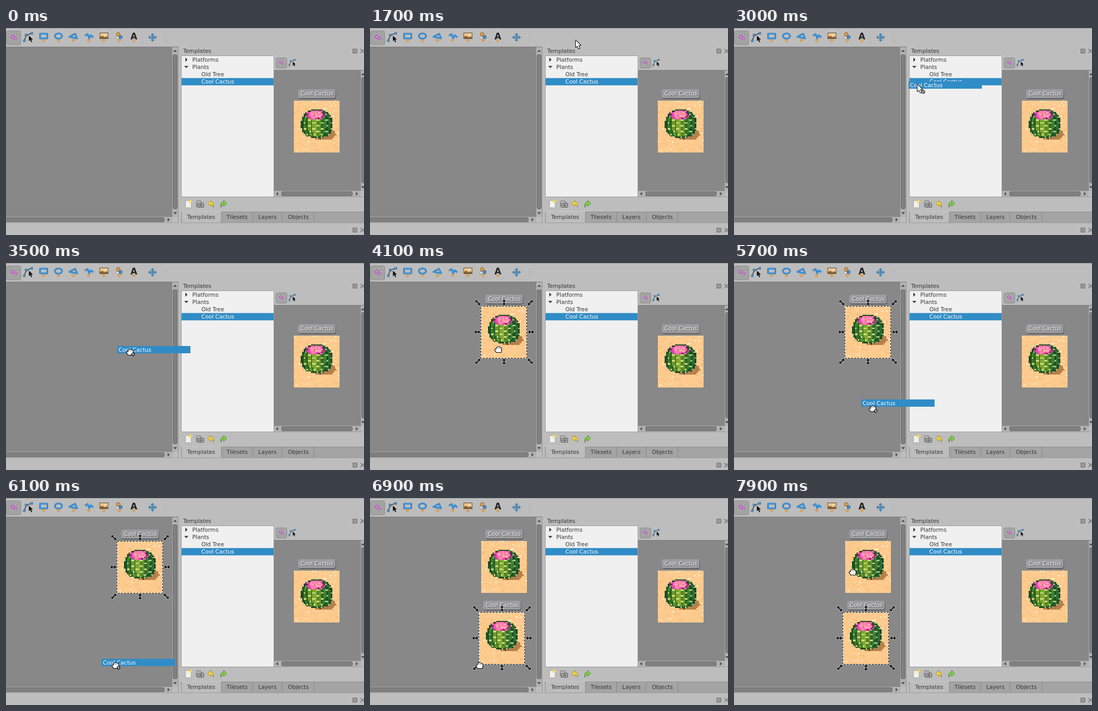
Recreate the animation shown at these times as an HTML page with a canvas. Size 689x399 px, loop 8 s.

```html
<!DOCTYPE html>
<html>
<head>
<meta charset="utf-8">
<style>
html, body { margin: 0; width: 100%; height: 100%; overflow: hidden; background: #bdbdbd; }
canvas { display: block; }
</style>
</head>
<body>
<canvas id="stage" width="689" height="399"></canvas>
<script>
const stage = document.getElementById('stage').getContext('2d');
let g = stage;

const rect = (x, y, w, h, c) => { g.fillStyle = c; g.fillRect(x, y, w, h); };

function round(x, y, w, h, r, fill, line) {
  g.beginPath();
  g.roundRect(x, y, w, h, r);
  if (fill) { g.fillStyle = fill; g.fill(); }
  if (line) { g.strokeStyle = line; g.lineWidth = 1; g.stroke(); }
}

function text(s, x, y, c = '#363636') {
  g.font = '10.67px "DejaVu Sans", sans-serif';
  g.fillStyle = c;
  g.fillText(s, x, y);
}

// Polygon or polyline through a flat list of coordinates
function poly(pts, fill, line, width = 1, closed = true) {
  g.beginPath();
  for (let i = 0; i < pts.length; i += 2) g.lineTo(pts[i], pts[i + 1]);
  if (closed) g.closePath();
  if (line) { g.strokeStyle = line; g.lineWidth = width; g.lineJoin = 'round'; g.stroke(); }
  if (fill) { g.fillStyle = fill; g.fill(); }
}

function oval(x, y, rx, ry, fill, line, width = 1) {
  g.beginPath();
  g.ellipse(x, y, rx, ry, 0, 0, 7);
  if (fill) { g.fillStyle = fill; g.fill(); }
  if (line) { g.strokeStyle = line; g.lineWidth = width; g.stroke(); }
}

function at(x, y, turn, scale, draw) {
  g.save();
  g.translate(x, y);
  g.rotate(turn);
  g.scale(scale, scale);
  draw();
  g.restore();
}

function layer(w, h, draw) {
  const c = document.createElement('canvas');
  c.width = w;
  c.height = h;
  const old = g;
  g = c.getContext('2d');
  draw();
  g = old;
  return c;
}

let seed = 11;
const rnd = () => (seed = seed * 16807 % 2147483647) / 2147483647;

// Pixel art: sand, shadow, ribbed body, flower
const cactus = layer(32, 36, () => {
  const ribs = ['#1c4f1e', '#437f2c', '#2a6428', '#6b9a2d', '#41762b', '#7ca630', '#8db335',
    '#4c852c', '#68982f', '#2c682b', '#40802f', '#17502a', '#2f6d30', '#0f4424'];
  const pinks = ['#ff8fae', '#ffa9bc', '#f868a0', '#ff7f98'];
  for (let y = 0; y < 36; y++) for (let x = 0; x < 32; x++) {
    const n = rnd(), m = rnd();
    let c = n < .02 ? '#ffe9cc' : n < .09 ? '#f4bf7e' : n < .2 ? '#fed19a' : '#fdca8d';
    if (((x - 20.5) / 8.6) ** 2 + ((y - 22.8) / 4.2) ** 2 < 1) c = '#b5804a';
    const v = Math.abs((y - 15.4) / 9.9), p = y < 15 ? 2.2 : 2.8;
    const half = 11 * Math.pow(Math.max(0, 1 - v ** p), 1 / p);
    const u = (x - 15.8) / (half || 1);
    if (v < 1 && Math.abs(u) <= 1) {
      const k = Math.min(13, Math.floor((u + 1) * 7));
      c = ribs[k];
      if (v > .92) c = '#184a20';
      if (k % 2 && (y + k) % 4 == 0) c = u > .4 ? '#a9c47a' : '#dcdc80';
    }
    const f = ((x - 14.8) / 6.4) ** 2 + ((y - 9.4) / 3.6) ** 2;
    if (f < 1 && y > 6)
      c = f > .5 ? (m < .3 ? '#5a2a38' : m < .75 ? '#e83cc0' : '#f878b0') : pinks[Math.floor(m * 4)];
    if (x == 18 && y > 24 && y < 27) c = '#4f4a26';
    rect(x, y, 1, 1, c);
  }
});

function object(x, y) {
  g.imageSmoothingEnabled = false;
  g.drawImage(cactus, x + .5, y, 88, 100);
  round(x + 10, y - 21, 72, 18, 4, '#606060');
  round(x + 9, y - 22, 72, 17, 4, '#9e9ea1');
  text('Cool Cactus', x + 15, y - 9, '#404040');
  text('Cool Cactus', x + 14, y - 10, '#fff');
}

function handle(x, y, turn, len) {
  at(x, y, turn, 1, () => {
    const l = len, b = len - 3.5;
    poly([-l, 0, -b, -3.5, -b, -.8, b, -.8, b, -3.5, l, 0, b, 3.5, b, .8, -b, .8, -b, 3.5],
      '#000', 'rgba(255,255,255,.35)', 1.6);
  });
}

function selection(x, y, t) {
  g.lineWidth = 1;
  g.strokeStyle = '#fff';
  g.strokeRect(x + .5, y + .5, 88, 100);
  g.strokeStyle = '#000';
  g.setLineDash([3, 3]);
  g.lineDashOffset = -t / 100;
  g.strokeRect(x + .5, y + .5, 88, 100);
  g.setLineDash([]);
  const q = Math.PI / 4;
  for (const [dx, dy, turn] of [[-5.5, -6.5, 1], [95.5, -6.5, -1], [-5.5, 106.5, -1], [95.5, 106.5, 1]])
    handle(x + dx, y + dy, turn * q, 6.5);
  handle(x + 45, y - 7, 2 * q, 5.5);
  handle(x + 45, y + 107, 2 * q, 5.5);
  handle(x - 6.5, y + 50, 0, 5.5);
  handle(x + 97, y + 50, 0, 5.5);
}

// Scroll bars: one triangle per end, one thumb between
function tri(x, y, turn) {
  at(x, y, turn, 1, () => poly([-3.5, 2, 0, -2, 3.5, 2], '#4a4a4a'));
}
function thumb(x, y, w, h) {
  round(x + .5, y + .5, w - 1, h - 1, 2, '#808080', '#686868');
}
function track(x, y, w, h) {
  rect(x, y, w, h, '#b2b2b2');
}

const arrowShape = [0, 0, 0, 13, 3, 10.2, 5.4, 15.6, 7.6, 14.6, 5.2, 9.3, 9.4, 9.3];

function selectIcon(x, y, s) {
  at(x, y, 0, s, () => {
    round(-7.5, -5.5, 15, 11, 0, null, '#e4dce4');
    g.strokeStyle = '#6a6a6a';
    g.setLineDash([2, 2]);
    g.strokeRect(-7.5, -5.5, 15, 11);
    g.setLineDash([]);
    oval(-2, -1, 3.5, 3, '#dc88dc', '#a040a8');
    round(0, 0, 5, 4, 1, '#e09ae2', '#a040a8');
  });
}

function nodeIcon(x, y, s) {
  at(x, y, 0, s, () => {
    g.beginPath();
    g.moveTo(-7, 6);
    g.quadraticCurveTo(-5, -6, 7, -7);
    g.strokeStyle = '#303840';
    g.lineWidth = 1.2;
    g.stroke();
    for (const [a, b] of [[-7, 6], [-4, -4], [6, -7]]) {
      rect(a - 2, b - 2, 4, 4, '#1d5f98');
      rect(a - 1, b - 1, 2, 2, '#7ec0f0');
    }
    at(1, -3, 0, .75, () => poly(arrowShape, '#111'));
  });
}

function blue(pts, closed) {
  poly(pts, null, '#186cb8', 3, closed);
  poly(pts, null, '#45a5ee', 1.4, closed);
}

function toolbar() {
  round(.5, 5.5, 28, 27, 3, '#a3a3a3', '#8f8f8f');
  selectIcon(15, 18, 1);
  nodeIcon(43, 18, 1.1);
  blue([65.5, 11, 79.5, 11, 79.5, 20, 65.5, 20], true);
  oval(101, 15.5, 7, 5, null, '#186cb8', 3);
  oval(101, 15.5, 7, 5, null, '#45a5ee', 1.4);
  blue([122, 17, 133, 11, 137, 20], true);
  blue([152, 15, 157, 11.5, 160, 20, 163, 14, 168, 18], false);
  rect(180, 9, 17, 12, '#5c5040');
  rect(181, 10, 15, 10, '#ecc48c');
  poly([181, 20, 181, 17, 185, 15, 190, 18, 193, 16, 196, 18, 196, 20], '#8a6030');
  oval(191, 13, 1.5, 1.5, '#fff0b0');
  oval(216, 12.5, 3.5, 4, '#dc9a50', '#96601e');
  round(211.5, 16.5, 6, 4, 2, '#f0f0f0', '#8a8a8a');
  round(217.5, 14.5, 6, 6, 2, '#4a90d0', '#235f96');
  g.font = 'bold 17px "DejaVu Sans", sans-serif';
  g.fillStyle = '#222';
  g.textAlign = 'center';
  g.fillText('A', 246, 22);
  g.textAlign = 'left';
  for (const x of [72, 101, 130, 159, 188, 218, 246]) {
    oval(x, 23.5, 3, 1.5, '#f2b868', '#c08030', .8);
    rect(x - 1.5, 25, 3, 2, '#d99a4c');
  }
  for (let i = 0; i < 4; i++) at(282, 18, i * Math.PI / 2, 1, () =>
    poly([-1, 0, -1, -5, -3, -5, 0, -8, 3, -5, 1, -5, 1, 0], '#4e92c4', '#225b88', .9));
  rect(281, 17, 2, 2, '#4e92c4');
  for (let y = 11; y < 27; y += 3) { rect(305, y, 1, 1, '#a4a4a4'); rect(308, y, 1, 1, '#a4a4a4'); }
}

function bentArrow(x, dir, fill, line) {
  g.save();
  g.translate(x, 339);
  g.scale(dir, 1);
  g.beginPath();
  g.moveTo(-6.5, -1);
  g.lineTo(-1, -6.5);
  g.lineTo(-1, -3.5);
  g.quadraticCurveTo(7, -3, 4, 7);
  g.quadraticCurveTo(4, 1, -1, 1.5);
  g.lineTo(-1, 4.5);
  g.closePath();
  g.fillStyle = fill;
  g.strokeStyle = line;
  g.lineWidth = 1;
  g.fill();
  g.stroke();
  g.restore();
}

function dockButtons(y) {
  g.strokeStyle = '#606060';
  g.lineWidth = 1;
  g.strokeRect(667.5, y - 3.5, 8, 8);
  g.strokeRect(669.5, y - 1.5, 4, 4);
  poly([682, y - 3.5, 690, y + 4.5], null, '#686868', 1.2, false);
  poly([690, y - 3.5, 682, y + 4.5], null, '#686868', 1.2, false);
}

const ui = layer(689, 399, () => {
  rect(0, 0, 689, 399, '#bdbdbd');
  rect(0, 0, 689, 1, '#8f8f8f');
  rect(0, 1, 689, 1, '#c4c4c4');
  toolbar();

  rect(0, 36, 332, 1, '#7a7a7a');
  rect(0, 37, 320, 327, '#888');
  track(320, 37, 12, 327);
  tri(325.5, 44, 0);
  thumb(321, 51, 9, 298);
  tri(325.5, 357, Math.PI);
  track(0, 364, 320, 11);
  thumb(-4, 365, 309, 9);
  tri(313, 369.5, Math.PI / 2);
  rect(0, 375, 332, 1, '#a0a0a0');
  rect(331, 37, 1, 339, '#909090');

  text('Templates', 341, 48);
  dockButtons(44);
  dockButtons(389);

  rect(337, 53, 179, 273, '#9c9c9c');
  rect(338, 54, 177, 271, '#f0f0f0');
  poly([345, 57, 349.5, 61, 345, 65], '#444');
  poly([343, 73, 351, 73, 347, 77.5], '#444');
  text('Platforms', 358.5, 65);
  text('Plants', 358.5, 79);
  text('Old Tree', 376, 93);
  rect(338, 96.5, 177, 14, '#308cc6');
  text('Cool Cactus', 376, 107, '#fff');

  round(519.5, 57.5, 21, 20, 3, '#a3a3a3', '#8f8f8f');
  selectIcon(530, 66.5, .8);
  nodeIcon(551, 67, .8);
  rect(516, 81, 173, 1, '#7a7a7a');
  rect(516, 82, 167, 232, '#888');
  object(553, 140);
  track(683, 82, 6, 232);
  tri(687, 89, 0);
  thumb(684, 95, 9, 204);
  tri(687, 307, Math.PI);
  track(516, 314, 167, 11);
  tri(521.5, 319.5, -Math.PI / 2);
  thumb(530, 315, 137, 9);
  tri(675.5, 319.5, Math.PI / 2);
  rect(516, 325, 173, 1, '#9c9c9c');

  round(345.5, 332.5, 11, 14, 1, '#f0f0ea', '#a0a098');
  oval(355, 334, 3, 3, '#f4d848');
  round(366.5, 333.5, 9, 11, 1, '#c8c8c8', '#585858');
  round(368.5, 337.5, 12, 8, 1, '#a8a8a8', '#484848');
  rect(372, 340, 5, 3, '#686868');
  bentArrow(395, 1, '#f2d84a', '#a8861c');
  bentArrow(418, -1, '#86d04a', '#3f8a22');

  rect(414, 354, 275, 21, '#a4a4a4');
  rect(338, 353, 77, 1, '#c8c8c8');
  rect(414, 354, 275, 1, '#8c8c8c');
  rect(337, 375, 352, 1, '#9a9a9a');
  for (const x of [337, 414, 474, 531, 592]) rect(x, 354, 1, 21, '#8a8a8a');
  [['Templates', 348.5], ['Tilesets', 424.5], ['Layers', 485.5], ['Objects', 542.5]]
    .forEach(([s, x]) => text(s, x, 368));
});

function arrow(x, y, blocked) {
  at(x, y, 0, 1, () => poly(arrowShape, '#fff', '#000', 2));
  if (!blocked) return;
  oval(x + 11, y + 14, 3.2, 3.2, '#ddd', '#333', 1.3);
  poly([x + 9, y + 12, x + 13, y + 16], null, '#333', 1.2, false);
}

function hand(x, y, plus) {
  at(x, y, 0, 1, () => {
    g.beginPath();
    g.moveTo(-4, 5.5);
    g.lineTo(-7, 1);
    g.quadraticCurveTo(-7, -2, -4, -1);
    g.quadraticCurveTo(-5, -5, -2, -5);
    g.quadraticCurveTo(0, -6.5, 2, -5);
    g.quadraticCurveTo(6.5, -5, 6.5, 0);
    g.lineTo(5.5, 5.5);
    g.closePath();
    g.fillStyle = '#fff';
    g.strokeStyle = '#000';
    g.lineWidth = 1.2;
    g.fill();
    g.stroke();
    for (const a of [-1.5, 1, 3.5]) rect(a, -3.5, .8, 2, '#444');
    if (plus) {
      rect(2, 2.5, 7, 3, '#000');
      rect(4, .5, 3, 7, '#000');
      rect(3, 3.5, 5, 1, '#fff');
      rect(5, 1.5, 1, 5, '#fff');
    }
  });
}

// Paths as [ms, x, y]
const pointer = [[1500, 402, 0], [1900, 389, 48], [2300, 398, 105], [2700, 398, 105],
  [2800, 375, 104], [3000, 353, 109], [3300, 282, 142], [3600, 218, 187], [3900, 218, 187],
  [4000, 226, 188], [4100, 247, 167], [4400, 340, 125], [4700, 398, 106], [5000, 398, 106],
  [5100, 386, 104], [5300, 350, 158], [5600, 292, 261], [5700, 267, 281], [5900, 231, 311],
  [6100, 211, 323], [7400, 211, 323], [7500, 209, 305], [7900, 228.5, 143]];
const dragA = [[2800, 356, 98], [3000, 336, 103], [3300, 261, 133], [3600, 190, 174]];
const dragB = [[5100, 369, 98], [5300, 332, 150], [5600, 271, 244], [5700, 245, 263],
  [5900, 207, 297], [6100, 184, 310]];
const dropA = 3900, dropB = 6400;

function along(path, t) {
  const i = path.findIndex(k => k[0] > t);
  if (i < 0) return path[path.length - 1].slice(1);
  const a = path[Math.max(0, i - 1)], b = path[i];
  const f = Math.max(0, (t - a[0]) / (b[0] - a[0]));
  return [1, 2].map(n => Math.round(a[n] + (b[n] - a[n]) * f));
}

function frame(now) {
  const t = Math.floor(now % 8000 / 100) * 100;
  g.drawImage(ui, 0, 0);
  const placed = [];
  if (t >= dropA) placed.push([213, 83]);
  if (t >= dropB) placed.push([209, 220]);
  placed.forEach(p => object(...p));
  if (placed.length) selection(...placed[placed.length - 1], t);
  const drag = t >= 2800 && t < dropA ? dragA : t >= 5100 && t < dropB ? dragB : null;
  if (drag) {
    const [x, y] = along(drag, t);
    rect(x, y, 141, 14, '#308cc6');
    text('Cool Cactus', x + 2.5, y + 11, '#fff');
  }
  if (t >= 1500) {
    const [x, y] = along(pointer, t);
    const over = placed.some(([a, b]) => x >= a - 2 && x < a + 92 && y >= b && y < b + 108);
    if (drag ? x < 325 : over) hand(x, y, drag);
    else arrow(x, y, drag);
  }
  requestAnimationFrame(frame);
}
requestAnimationFrame(frame);
</script>
</body>
</html>
```
